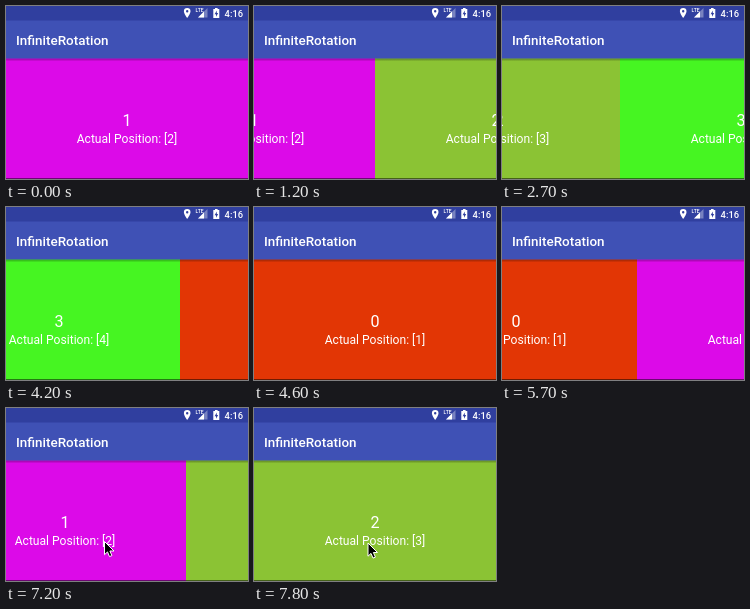
An HTML page that plays this animation: 242x173 px, repeating every 8000 ms.

```html
<!DOCTYPE html>
<html lang="en">
<head>
<meta charset="utf-8">
<title>InfiniteRotation</title>
<style>
  html, body { margin: 0; width: 100%; height: 100%; overflow: hidden; background: #303f9f; }
  svg { display: block; width: 100%; height: 100%; }
  text { font-family: Roboto, sans-serif; fill: #fff; }
  .medium { font-weight: 500; }
</style>
</head>
<body>
<svg viewBox="0 0 242 173">
  <defs>
    <linearGradient id="shade" x2="0" y2="1">
      <stop offset="0" stop-opacity=".32"/>
      <stop offset="1" stop-opacity="0"/>
    </linearGradient>
  </defs>

  <g id="pager"></g>
  <rect y="52.5" width="242" height="3" fill="url(#shade)"/>
  <rect y="172" width="242" height="1" fill="#000" opacity=".5"/>

  <rect width="242" height="14.5" fill="#303f9f"/>
  <rect y="14.5" width="242" height="38" fill="#3f51b5"/>
  <text class="medium" x="10" y="38.7" font-size="13.44">InfiniteRotation</text>

  <g fill="#fff">
    <path fill-rule="evenodd" d="M181.2 2a3.3 3.3 0 0 0-3.3 3.3c0 2.5 3.3 6.6 3.3 6.6s3.3-4.1 3.3-6.6A3.3 3.3 0 0 0 181.2 2zm0 2.1a1.2 1.2 0 1 1 0 2.4a1.2 1.2 0 0 1 0-2.4z"/>
    <path d="M201.5 2v9.5H192z" opacity=".35"/>
    <path d="M198 5.5v6h-6z"/>
    <text class="medium" x="189.5" y="6.2" font-size="5">LTE</text>
    <path fill-rule="evenodd" d="M209 2h2.6v1h1.7v9h-6V3h1.7zm1.8 2.5l-2.2 3.7h1.4v2.5l2.2-3.7h-1.4z"/>
  </g>
  <text class="medium" x="218.6" y="10.6" font-size="9.4">4:16</text>

  <path id="cursor" d="M0 0v13.2l3-2.8 2 4.7 2.4-1-2-4.6h4.1z"
        fill="#000" stroke="#fff" stroke-width="1" stroke-linejoin="round"/>
</svg>
<script>
const LOOP = 8000, STEP = 100, WIDTH = 242, SLIDE = 500;
const COLORS = ['#e23605', '#dc0ae8', '#8bc334', '#46f522'];
const ORDER = [1, 2, 3, 0, 1, 2];
const STARTS = [1135, 2633, 4168, 5645, 7171];

const pager = document.getElementById('pager');
const cursor = document.getElementById('cursor');

const clamp = v => Math.min(1, Math.max(0, v));
const quintOut = u => 1 - (1 - u) ** 5;
const mix = (a, b, u) => a + (b - a) * u;

pager.innerHTML = ORDER.map((n, i) => `
  <g transform="translate(${i * WIDTH} 0)">
    <rect y="52" width="${WIDTH}" height="121" fill="${COLORS[n]}"/>
    <g text-anchor="middle">
      <text x="121" y="119.7" font-size="16.13">${n}</text>
      <text x="121" y="137" font-size="12.1">Actual Position: [${n + 1}]</text>
    </g>
  </g>`).join('');

function render(time) {
  const t = Math.floor(time % LOOP / STEP) * STEP;

  const page = STARTS.reduce((sum, s) => sum + quintOut(clamp((t - s) / SLIDE)), 0);
  pager.setAttribute('transform', `translate(${-Math.round(page * WIDTH)} 0)`);

  // The pointer rises into view, then drifts right.
  const rise = clamp((t - 7100) / 100), drift = clamp((t - 7200) / 600);
  const x = mix(92, 98.5, rise) + 15.5 * drift;
  const y = mix(152, 133.5, rise) + 1.5 * drift;
  cursor.setAttribute('transform', `translate(${x} ${y})`);
  cursor.setAttribute('visibility', t >= 7100 ? 'visible' : 'hidden');
}

const begin = performance.now();
function tick() {
  render(performance.now() - begin);
  requestAnimationFrame(tick);
}
tick();
</script>
</body>
</html>
```
